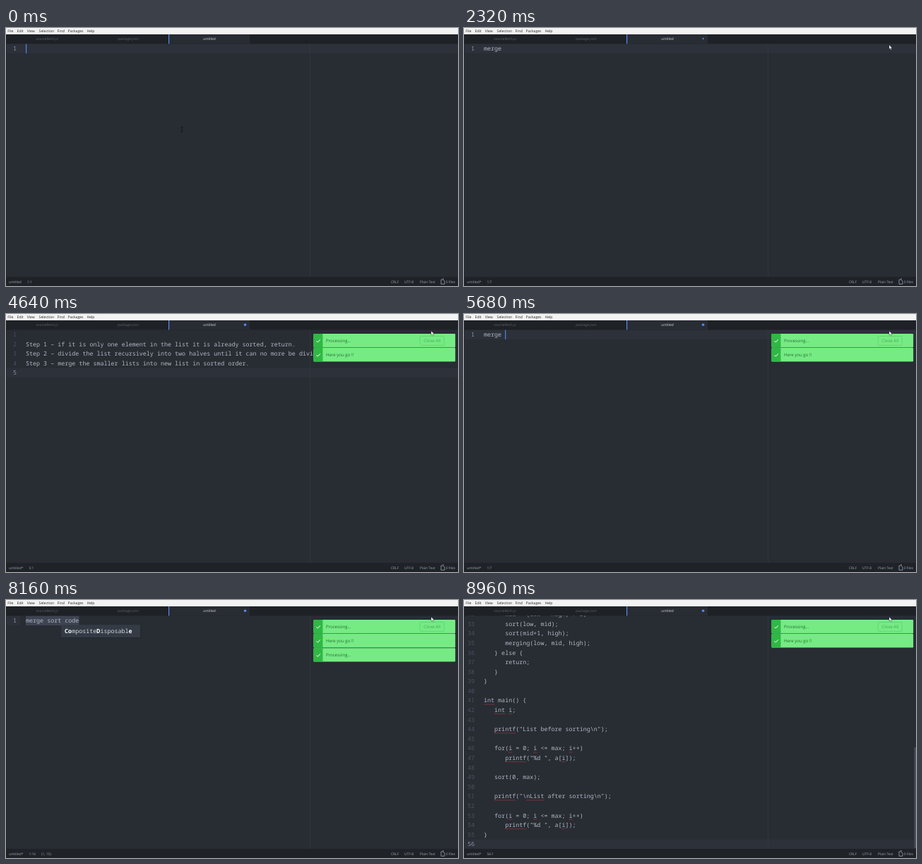
These frames come from a looping animation (640x366 px, 9.12 s). An HTML page:

```html
<!DOCTYPE html>
<html lang="en">
<head>
<meta charset="utf-8">
<title>Editor fetching snippets</title>
<style>
html, body { margin: 0; width: 100%; height: 100%; overflow: hidden; background: #282c33; }
svg { display: block; }
text { white-space: pre; text-rendering: geometricPrecision; font: 4.9px "Open Sans", "Noto Sans", sans-serif; }
.code { font: 8.38px "Noto Sans Mono", "DejaVu Sans Mono", monospace; }
.menu { font-size: 5.1px; }
.note { font-size: 6.1px; }
</style>
</head>
<body>
<svg id="stage" width="640" height="366" viewBox="0 0 640 366"></svg>
<script>
const LOOP = 9120, STEP = 80;
const CHAR = 8.38 * 0.6, ROW = 13.59, LEFT = 28, TOP = 22.4;
const stage = document.getElementById('stage');

const steps = ['',
  'Step 1 – if it is only one element in the list it is already sorted, return.',
  'Step 2 – divide the list recursively into two halves until it can no more be divided.',
  'Step 3 – merge the smaller lists into new list in sorted order.',
  ''];

const program = String.raw`      mid = (low + high) / 2;
      sort(low, mid);
      sort(mid+1, high);
      merging(low, mid, high);
   } else {
      return;
   }
}

int main() {
   int i;

   printf("List before sorting\n");

   for(i = 0; i <= max; i++)
      printf("%d ", a[i]);

   sort(0, max);

   printf("\nList after sorting\n");

   for(i = 0; i <= max; i++)
      printf("%d ", a[i]);
}
`.split('\n');

// [time, typed text or list of lines]
const edits = [
  [0, ''], [1440, 'm'], [1520, 'me'], [1680, 'mer'], [1760, 'merg'], [1840, 'merge'], [2000, 'merge '],
  [2560, 'merge so'], [2720, 'merge sor'], [2960, 'merge sort'], [4320, steps],
  [5280, ''], [5360, 'm'], [5440, 'mer'], [5600, 'merge'], [5680, 'merge '], [5760, 'merge s'],
  [5840, 'merge so'], [5920, 'merge sor'], [6000, 'merge sort'], [6480, 'merge sort '],
  [6560, 'merge sort c'], [6640, 'merge sort co'], [6720, 'merge sort cod'], [6800, 'merge sort code'],
  [8560, program]
];
const selected = [[3280, 4320], [4880, 5280], [7120, 8560]];
const caretOff = [[400, 800], [1200, 1440], [2320, 2560], [3440, 3840], [4480, 4880],
  [6320, 6480], [7040, 8560], [8960, LOOP]];
const altHeld = [[3440, 3760], [7280, 7600]];
// [from, to, column, word with matched letters marked]
const popups = [
  [2720, 3040, 6, '*s*o*urcefetchPackage'], [5920, 6080, 6, '*s*o*urcefetchPackage'],
  [6720, 6800, 11, '*C*o*mposite*D*isposable'], [6800, 8560, 11, '*C*o*mposite*D*isposabl*e*']
];
// [message, shown, hidden]
const notes = [['Processing...', 4100, 8240], ['Here you go !!', 4260, 8360],
  ['Processing...', 7940, LOOP], ['Here you go !!', 8500, LOOP]];
const mouse = [[160, 249, 144], [240, 330, 131], [320, 460, 116], [400, 565, 104], [480, 565, 104],
  [560, 578, 88], [720, 600, 40], [880, 608, 5], [1040, 602, 24], [LOOP, 602, 24]];
const menu = [[2.3, '&File'], [15.6, '&Edit'], [29.8, '&View'], [46.6, '&Selection'],
  [72.6, 'F&ind'], [87.6, '&Packages'], [114.4, '&Help']];

const within = (list, t) => list.some(([a, b]) => t >= a && t < b);
const clamp = v => Math.max(0, Math.min(1, v));
const esc = s => s.replace(/&/g, '&amp;').replace(/</g, '&lt;');
const rect = (x, y, w, h, fill, more = '') =>
  `<rect x="${x}" y="${y}" width="${w}" height="${h}" fill="${fill}" ${more}/>`;
const text = (x, y, body, fill, more = '') => `<text x="${x}" y="${y}" fill="${fill}" ${more}>${body}</text>`;
const code = (x, y, body, fill, more = '') => text(x, y, body, fill, 'class="code" ' + more);

function squiggles(line, y) {
  return [...line.matchAll(/\b(int|printf|nList|i)\b/g)].map(m => {
    const x = LEFT + m.index * CHAR;
    return `<path d="M${x} ${y}h${m[0].length * CHAR}" stroke="#b83a40" stroke-width=".9" stroke-dasharray="1.2 .8"/>`;
  }).join('');
}

function editor(t, lines, isSelected) {
  const isCode = lines === program, first = isCode ? 32 : 1;
  const top = isCode ? 339.7 - 24 * ROW : TOP;
  const last = lines.length - 1, lastY = top + last * ROW;
  const endX = LEFT + lines[last].length * CHAR;
  let out = rect(0, lastY, isSelected ? 20 : 640, ROW, '#2c313a');
  lines.forEach((line, i) => {
    const y = top + i * ROW, base = y + 9.6;
    if (isSelected) out += rect(LEFT, y, i < last ? 640 - LEFT : line.length * CHAR, ROW, '#3e4451');
    out += code(15, base, first + i, i === last ? '#8b93a2' : '#4a5160', 'text-anchor="end"');
    out += code(LEFT, base, esc(line), '#b0b7c3');
    if (isCode) out += squiggles(line, base + 2.6);
  });
  out += rect(430, 22, 0.7, 331, '#343942') + rect(0, 22, 0.8, 331, '#1f2328');
  if (!within(caretOff, t)) out += rect(endX, lastY, 1.1, ROW, '#568af2');
  if (isCode) out += rect(637.6, 209, 2.4, 143, '#484e59');
  return out;
}

function topBars(t, modified) {
  let out = rect(0, 9, 640, 13.4, '#1e2226') + rect(230, 9, 115, 13.4, '#282c33') + rect(230, 9, 1.2, 13.4, '#568af2');
  [['sourcefetch.js', '#5c636e'], ['package.json', '#5c636e'], ['untitled', '#d7dae0']].forEach(([name, fill], i) => {
    out += text(58 + i * 115, 17, name, fill, 'text-anchor="middle"');
  });
  if (modified) out += `<circle cx="338.6" cy="15.2" r="${t < 2400 ? 1.1 : 1.8}" fill="#568af2"/>`;
  out += rect(0, 0, 640, 9, '#f3f3f3');
  const key = within(altHeld, t) ? '<tspan text-decoration="underline">$1</tspan>' : '$1';
  for (const [x, name] of menu) out += text(x, 6.3, name.replace(/&(.)/, key), '#222', 'class="menu"');
  return out;
}

function statusBar(lines, isSelected, modified) {
  const line = lines === program ? 56 : lines.length;
  const end = lines[lines.length - 1].length;
  const span = s => `<tspan dx="8">${s}</tspan>`;
  let left = (modified ? 'untitled*' : 'untitled') + span(`${line}:${end + 1}`);
  if (isSelected) left += span(`(${line}, ${lines.join('\n').length})`);
  let out = rect(0, 353, 640, 13, '#1f2328') + text(4, 361.8, left, '#9da5b4');
  for (const [x, s] of [[545, 'CRLF'], [564, 'UTF-8'], [586, 'Plain Text'], [622.8, '0 files']])
    out += text(x, s === '0 files' ? 362.3 : 361.8, s, '#9da5b4');
  return out + '<path d="M616 357h3l2 2v4.3h-5zM618 355.8h2" fill="none" stroke="#9da5b4" stroke-width=".8"/>';
}

function popup(t) {
  const hit = popups.find(([a, b]) => t >= a && t < b);
  if (!hit) return '';
  const [, , col, marked] = hit, x = LEFT + col * CHAR;
  const size = marked.replace(/\*/g, '').length;
  // letters between odd markers are matches; "*C*o*" marks both
  const body = marked.replace(/\*(\w)\*(\w)\*/, '*$1$2*')
    .replace(/\*(\w+?)\*/g, '<tspan font-weight="700" fill="#fff">$1</tspan>');
  return rect(x - 4.6, 36, size * CHAR + 17, 18, '#1d2025', 'opacity=".45"') +
    rect(x - 5, 35.2, size * CHAR + 16.4, 17.8, '#353b45') +
    code(x - 0.2, 47, body, '#d2d6de');
}

function notifications(t) {
  const live = notes.filter(([, a, b]) => t >= a && t < b + 360);
  let y = 28, out = '';
  for (const [message, shown, hidden] of live) {
    const enter = 1 - (1 - clamp((t - shown) / 160)) ** 2;
    const leave = clamp((t - hidden) / 120), shrink = clamp((t - hidden - 120) / 240);
    const size = 1 - 0.2 * leave;
    out += `<g opacity="${enter * (1 - leave)}" transform="translate(536 ${y + 9.7}) scale(${size} ${size * enter}) translate(-536 -9.7)">` +
      rect(435.5, 0, 200.7, 19.4, '#76eb84', 'rx="1"') + rect(435.5, 0, 13, 19.4, '#2fb844', 'rx="1"') +
      '<path d="M439.6 10.2l1.8 1.9 3.5-3.9" fill="none" stroke="#fff" stroke-width="1"/>' +
      text(453, 12.3, message, '#2a6d36', 'class="note"') + '</g>';
    y += 20.1 * (1 - shrink);
  }
  if (live.length > 1) {
    out += rect(586.3, 31.6, 34, 12.8, 'none', 'rx="1" stroke="#5fcf6f" stroke-width=".7"') +
      text(603.3, 40.3, 'Close All', '#46a957', 'class="note" text-anchor="middle"');
  }
  return out;
}

function pointer(t) {
  const i = Math.max(1, mouse.findIndex(p => p[0] > t));
  const [t0, x0, y0] = mouse[i - 1], [t1, x1, y1] = mouse[i];
  const k = clamp((t - t0) / (t1 - t0));
  const at = `translate(${x0 + (x1 - x0) * k} ${y0 + (y1 - y0) * k})`;
  return t < 800
    ? `<path transform="${at}" d="M-1.4-3.2h2.8M0-3.2v6.4M-1.4 3.2h2.8" stroke="#101215" stroke-width=".8"/>`
    : `<path transform="${at}" d="M0 0v6l1.4-1.2 1 2.1 1-.5-1-2h1.9z" fill="#fff" stroke="#15171a" stroke-width=".35"/>`;
}

function draw(t) {
  const content = edits.filter(e => e[0] <= t).pop()[1];
  const lines = typeof content === 'string' ? [content] : content;
  const isSelected = within(selected, t), modified = t >= 2320;
  stage.innerHTML = rect(0, 0, 640, 366, '#282c33') + editor(t, lines, isSelected) + topBars(t, modified) +
    statusBar(lines, isSelected, modified) + popup(t) + notifications(t) + pointer(t);
}

let shownAt = -1;
function tick() {
  const t = Math.floor(performance.now() % LOOP / STEP) * STEP;
  if (t !== shownAt) draw(shownAt = t);
  requestAnimationFrame(tick);
}
tick();
</script>
</body>
</html>
```
